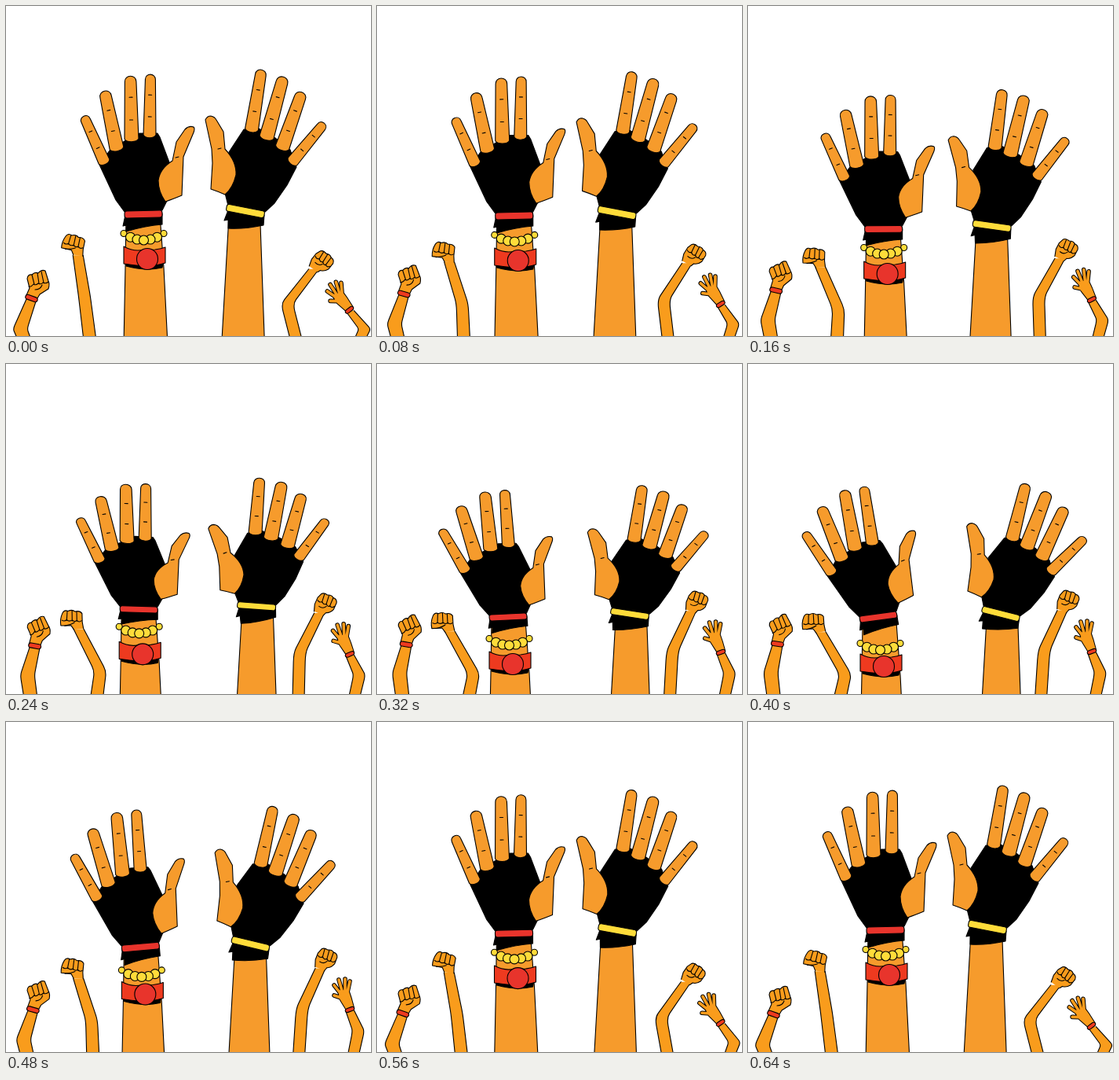
Recreate the animation shown at these times as an HTML page. Size 465 by 420 pixels, loop 720 ms.

```html
<!DOCTYPE html>
<html lang="en">
<head>
<meta charset="utf-8">
<title>Raised hands</title>
<style>
  html, body { margin: 0; width: 100%; height: 100%; overflow: hidden; background: #fff; }
  svg { display: block; width: 465px; height: 420px; }
  path, circle, rect {
    stroke: #000; stroke-width: 1.1; stroke-linejoin: round; stroke-linecap: round;
    vector-effect: non-scaling-stroke;
  }
</style>
</head>
<body>
<svg id="stage" viewBox="0 0 465 420"></svg>
<script>
const SKIN = '#f69b2c', SMALL = '#f99c1c', RED = '#e8342c', ORANGE = '#ee3a1f', YELLOW = '#ffdc3a';
const LOOP = 720, STEP = 80, END = 640;
const stage = document.getElementById('stage');

function add(parent, tag, attrs = {}) {
  const el = document.createElementNS('http://www.w3.org/2000/svg', tag);
  for (const key in attrs) el.setAttribute(key, attrs[key]);
  parent.appendChild(el);
  return el;
}
const group = parent => add(parent, 'g');
const shape = (parent, d, fill = 'none') => add(parent, 'path', { d, fill });
const place = (el, transform) => el.setAttribute('transform', transform);
const mix = (a, b, f) => a.map((v, i) => v + (b[i] - v) * f);

// Tapered finger from base to tip, with two creases
function finger(parent, bx, by, tx, ty, width) {
  const len = Math.hypot(tx - bx, ty - by);
  const ux = (tx - bx) / len, uy = (ty - by) / len;
  const at = (along, side) => `${bx + ux * along - uy * side} ${by + uy * along + ux * side}`;
  const w = width / 2, n = w * .81, top = len - n;
  shape(parent, `M${at(0, -w)}L${at(top, -n)}C${at(len + n * .3, -n)} ${at(len + n * .3, n)} ${at(top, n)}` +
    `L${at(0, w)}C${at(-5, w * .7)} ${at(-5, -w * .7)} ${at(0, -w)}Z`, SKIN);
  for (const f of [.3, .66]) shape(parent, `M${at(len * f, -2)}L${at(len * f, 2)}`);
}

function band(parent, x, y, turn, w, h, fill) {
  add(parent, 'rect', { x: x - w / 2, y: y - h / 2, width: w, height: h, rx: 3, fill, transform: `rotate(${turn} ${x} ${y})` });
}

// Big left arm
const armL = group(stage), beads = group(stage), handL = group(stage);
shape(armL, 'M153 266L152 333L148 530L211 530L201 333L196 266Z', SKIN);
shape(armL, 'M153 327L200 327L199 333Q178 338 153 331Z', '#000');
shape(armL, 'M150 306Q159 311 168 311L190 310Q198 309 203 307L203 327Q190 331 177 331Q162 330 150 328Z', ORANGE);
add(armL, 'circle', { cx: 180, cy: 322, r: 13.5, fill: RED });
for (let k = 3; k >= 0; k--)
  for (const i of k ? [-k, k] : [0])
    add(beads, 'circle', { cx: 175.5 + 8.5 * i, cy: 298 - .95 * i * i, r: k === 3 ? 4 : 6, fill: YELLOW });

shape(handL, 'M152 266L149 280L154 279L153 287Q176 280 199 278L199 264Z', '#000');
shape(handL, 'M119 202L132 184L151 172L170 162L193 162L196 167L208 199L206 246L199 260L151 262L140 247Z', '#000');
finger(handL, 125, 198, 99, 140, 15);
finger(handL, 141, 181, 125.5, 108, 18);
finger(handL, 160, 169, 158.5, 89, 18);
finger(handL, 183, 164, 184, 87, 16);
shape(handL, 'M228 157Q233 152 239 154Q241 156 239 161L226 192L224 241Q212 246 203 249Q194 236 194 222Q196 207 212 197L217 173Z', SKIN);
shape(handL, 'M216 193L220 192');
band(handL, 175, 265, -1.5, 48, 9, RED);

// Big right arm
const armR = group(stage), handR = group(stage);
shape(armR, 'M284 268L283 285L269 530L333 530L324 277L323 268Z', SKIN);
shape(handR, 'M283 260L278 273L283 272L283 283Q305 284 328 279L329 266Z', '#000');
shape(handR, 'M303 157L322 156L343 168L362 183L370 205L358 228L342 251L330 262L283 254L279 238L293 215L284 186Z', '#000');
finger(handR, 313, 157, 325.5, 81, 17);
finger(handR, 332, 167, 353.5, 90, 18.5);
finger(handR, 352, 180, 377, 109.5, 18);
finger(handR, 365, 198, 405.5, 149, 15);
shape(handR, 'M254 145Q256 140 261 140Q266 141 268 145L277 160L279 182Q294 198 293 215Q289 232 279 240Q270 236 261 233L263 200L262 182Z', SKIN);
shape(handR, 'M270 182L274 181');
band(handR, 305, 261, 11, 49, 9, YELLOW);

// Small hands, drawn around their own centre
function fistUp(g) {
  shape(g, 'M-15 16L-11 7L-14 -5Q-13 -11 -8 -10Q-4 -14 0 -12Q4 -17 9 -15L13 -2Q15 2 13 8L2 15L-1 20', SMALL);
  shape(g, 'M-8 -10L-5 2M-1 -12L1 1M4 -14L7 0M-12 5Q-9 6 -6 2Q-3 4 0 1Q4 3 6 0Q10 2 13 -1M-4 9Q3 9 5 3');
  band(g, -8.5, 20, 20, 16, 6, ORANGE);
}
function fistSide(g) {
  shape(g, 'M4 14L0 9L-13 10Q-15 2 -12 -6Q-10 -11 -5 -9Q0 -12 4 -9Q10 -11 13 -7L14 4L16 12', SMALL);
  shape(g, 'M-6 -9L-6 3M0 -10L1 3M6 -9L7 3M-12 3Q-9 5 -6 2Q-3 5 1 2Q4 5 7 2Q10 5 13 2M-8 10Q0 8 4 5');
}
function fistBack(g) {
  shape(g, 'M-11 14L-13 5L-12 -4L-9 -10Q-6 -13 -1 -11Q4 -13 7 -10Q12 -10 13 -5L12 4Q9 10 4 11L2 15', SMALL);
  shape(g, 'M-5 -11L-5 0M1 -11L1 1M7 -10L6 2M-11 -1Q-8 2 -5 -1Q-2 3 1 0Q4 4 6 1Q9 4 12 0M-7 6Q-1 8 2 3');
}
function openHand(g) {
  const d = 'M-5 -2L-12 -11M-2 -4L-6 -18M2 -4L2 -19M5 -2L8 -16M-3 5L-12 2M-5 -3L5 -3L8 6L11 17L5 19L-3 6Z';
  add(g, 'path', { d, fill: '#000', style: 'stroke-width:5.6' });
  add(g, 'path', { d, fill: SMALL, style: `stroke-width:3.6;stroke:${SMALL}` });
  band(g, 8, 20, -20, 12, 5, ORANGE);
}

// Two end poses each: hand x, y, turn, elbow x, y, foot x
const smalls = [
  { draw: fistUp, wrist: [-8.5, 21], half: [6.5, 9, 8.5], hold: 400, from: [41, 352, 0, 18, 411, 24], to: [42, 335, -11, 29, 393, 33] },
  { draw: fistSide, wrist: [10, 13], half: [6.5, 7.5, 8], hold: 400, from: [86, 302, 17, 100, 370, 107], to: [83, 328, 1, 124, 395, 117] },
  { draw: fistBack, wrist: [-4, 14], half: [6.5, 7.5, 7.5], hold: 480, from: [403, 325, 32, 358, 379, 370], to: [408, 301, 15, 377, 365, 373] },
  { draw: openHand, wrist: [8, 21], half: [5.5, 7.5, 7], hold: 480, from: [424, 370, -17, 457, 411, 450], to: [430, 346, 0, 449, 393, 442] }
];
for (const s of smalls) {
  s.arm = shape(stage, '', SMALL);
  s.hand = group(stage);
  s.draw(s.hand);
}

// Timing, each from 0 to 1 and back within the loop
const settle = (t, hold) => Math.min(1, Math.max(0, (END - t) / (END - hold))) ** 2.4;
const dropAt = t => t <= 400 ? Math.sin(Math.PI / 2 * Math.min(1, t / 300)) ** 3.7 : settle(t, 400);
const leanAt = t => Math.abs(t - 400) < 160 ? Math.cos(Math.PI * (t - 400) / 320) ** 2 : 0;
const swingAt = (t, hold) => t < 400 ? 1 - (1 - t / 400) ** 2 : settle(t, hold);

function bentArm(points, half) {
  const side = sign => points.map(([x, y], i) => [x + sign * half[i], y]);
  const [l0, l1, l2] = side(-1), [r0, r1, r2] = side(1);
  return `M${l0}L${mix(l1, l0, .12)}Q${l1} ${mix(l1, l2, .2)}L${l2}L${r2}L${mix(r1, r2, .2)}Q${r1} ${mix(r1, r0, .12)}L${r0}`;
}

function draw(ms) {
  const t = Math.floor(ms % LOOP / STEP) * STEP;
  const drop = dropAt(t), lean = leanAt(t);
  const squash = 1 - .12 * drop + .05 * lean;

  place(handL, `translate(${175 - 7 * drop - 2 * lean} ${265 + 57 * drop}) skewY(${3.4 * drop}) ` +
    `rotate(${-9.5 * lean}) scale(1 ${squash}) translate(-175 -265)`);
  place(armL, `translate(${-7 * drop} ${57 * drop + 6 * lean})`);
  place(beads, `translate(${-7 * drop} ${54 * drop + 12 * lean})`);

  place(handR, `translate(${305 + 17 * drop} ${261 + 57 * drop}) ` +
    `rotate(${11 * lean - 7 * drop}) scale(1 ${squash}) translate(-305 -261)`);
  place(armR, `translate(${20 * drop} ${57 * drop})`);

  for (const s of smalls) {
    const [x, y, turn, ex, ey, foot] = mix(s.from, s.to, swingAt(t, s.hold));
    const a = turn * Math.PI / 180, [wx, wy] = s.wrist;
    const wrist = [x + wx * Math.cos(a) - wy * Math.sin(a), y + wx * Math.sin(a) + wy * Math.cos(a)];
    s.arm.setAttribute('d', bentArm([wrist, [ex, ey], [foot, 426]], s.half));
    place(s.hand, `translate(${x} ${y}) rotate(${turn})`);
  }
}

let start;
function tick(now) {
  start ??= now;
  draw(now - start);
  requestAnimationFrame(tick);
}
draw(0);
requestAnimationFrame(tick);
</script>
</body>
</html>
```
